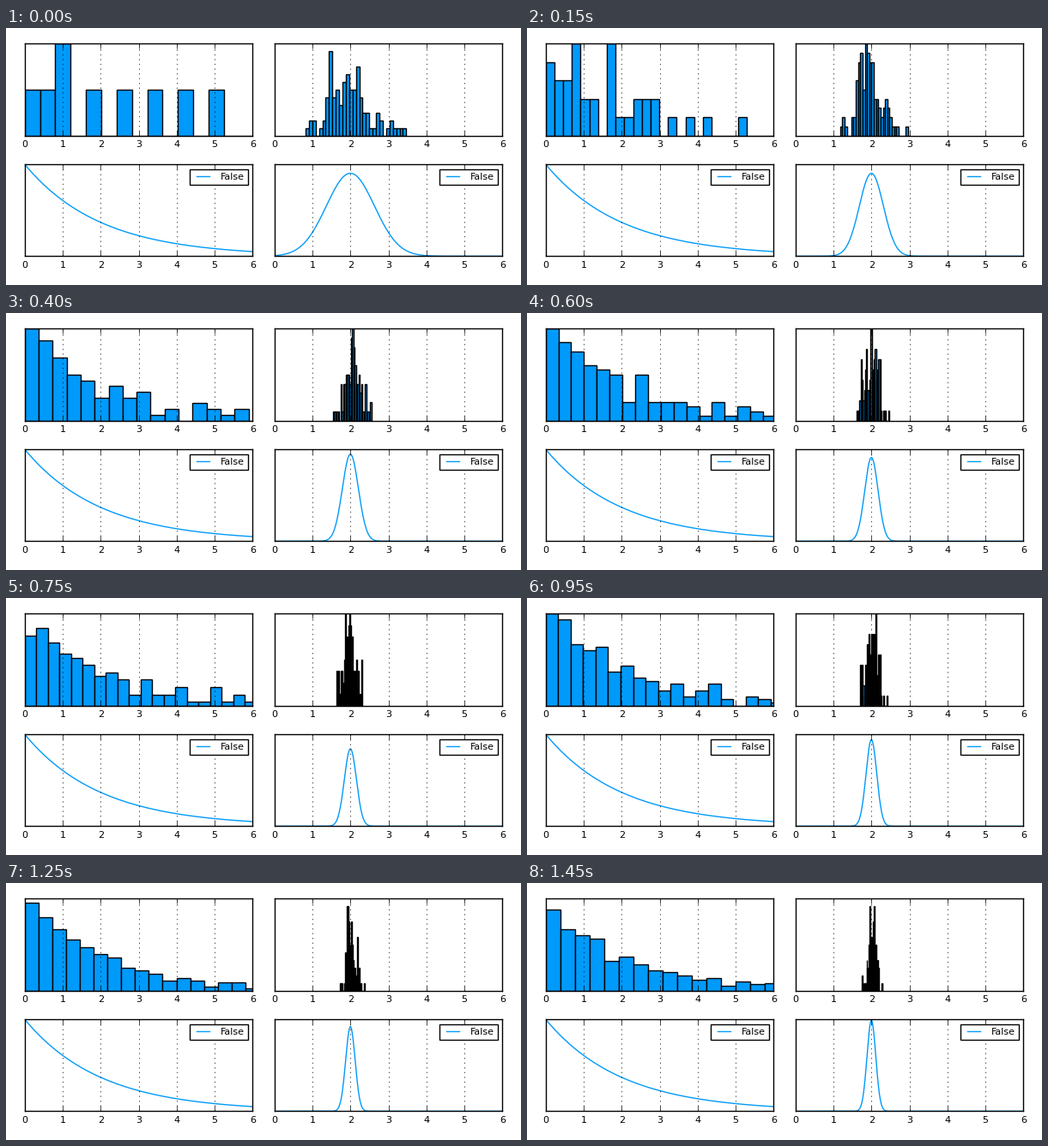
Write a matplotlib script that moves like this. It is 600 px wide and 300 px high and loops after 1.5 s.

```python
import math

import matplotlib.pyplot as plt
import numpy as np
from matplotlib.animation import FuncAnimation

W, H, DPI = 600, 300, 100
FRAMES, INTERVAL = 30, 50
LEFT, RIGHT, TOP, BOTTOM = 21.65, 312.65, 18.1, 158.97
PANEL_W, PANEL_H = 265.75, 107.4
BINS = 30
MEAN = 2.0
BLUE = "#009afa"

# Largest value drawn, at a few sample sizes
SIZES = [10, 40, 90, 130, 160, 230, 300]
LARGEST = [12.1, 6.9, 11.05, 10.1, 9.15, 10.4, 11.55]

plt.style.use("classic")
plt.rcParams.update({
    "font.family": "DejaVu Sans",
    "font.size": 8,
    "xtick.labelsize": 8,
    "figure.facecolor": "white",
    "savefig.facecolor": "white",
    "savefig.dpi": DPI,
})


def exponential_sample(n, rng):
    """Evenly ranked exponential values with their ranks shaken."""
    rank = np.arange(n) + .5 + rng.normal(0, .25 * math.sqrt(n), n)
    return -MEAN * np.log(1 - rank / n % 1)


def histograms(n):
    rng = np.random.default_rng(n)
    span = np.interp(n, SIZES, LARGEST)
    sample = np.histogram(exponential_sample(n, rng), BINS, (0, span))
    means = np.histogram(rng.exponential(MEAN, (100, n)).mean(axis=1), BINS)
    return sample, means


def normal(n):
    sd = MEAN / math.sqrt(n)
    return np.exp(-((x - MEAN) / sd) ** 2 / 2) / (sd * math.sqrt(2 * math.pi))


def round_top(peak):
    """Upper axis limit: the next multiple of a 1-2-5 step."""
    raw = peak / 9
    scale = 10 ** math.floor(math.log10(raw))
    step = next(s * scale for s in (1, 2, 5, 10) if s * scale >= raw - 1e-9)
    return math.ceil(peak / step - 1e-9) * step


def panel(left, top):
    ax = fig.add_axes([left / W, 1 - (top + PANEL_H) / H,
                       PANEL_W / W, PANEL_H / H])
    ax.set_xticks(range(7))
    ax.set_yticks([])
    ax.grid(True, axis="x")
    return ax


def bar_panel(left):
    ax = panel(left, TOP)
    bars = ax.bar(range(BINS), [0] * BINS, color=BLUE, edgecolor="black",
                  linewidth=1)
    ax.set_xlim(0, 6)
    return ax, bars


def curve_panel(left, y):
    ax = panel(left, BOTTOM)
    line, = ax.plot(x, y, color=BLUE, linewidth=1, label="False")
    ax.set_xlim(0, 6)
    ax.set_ylim(0, round_top(y.max()))
    ax.legend(loc="upper right", fontsize=8)
    return ax, line


def set_bars(target, hist):
    ax, bars = target
    counts, edges = hist
    for bar, left, width, height in zip(bars, edges, np.diff(edges), counts):
        bar.set_bounds(left, 0, width, height)
    ax.set_ylim(0, round_top(counts.max()))


def update(frame):
    n = 10 * (frame + 1)
    sample, means = histograms(n)
    set_bars(sample_panel, sample)
    set_bars(means_panel, means)
    y = normal(n)
    bell.set_ydata(y)
    bell_ax.set_ylim(0, round_top(y.max()))


fig = plt.figure(figsize=(W / DPI, H / DPI), dpi=DPI)
x = np.linspace(0, 6, 601)
sample_panel = bar_panel(LEFT)
means_panel = bar_panel(RIGHT)
curve_panel(LEFT, np.exp(-x / MEAN) / MEAN)
bell_ax, bell = curve_panel(RIGHT, normal(10))

anim = FuncAnimation(fig, update, frames=FRAMES, interval=INTERVAL,
                     repeat=True, repeat_delay=0, blit=False)
plt.show()
```
